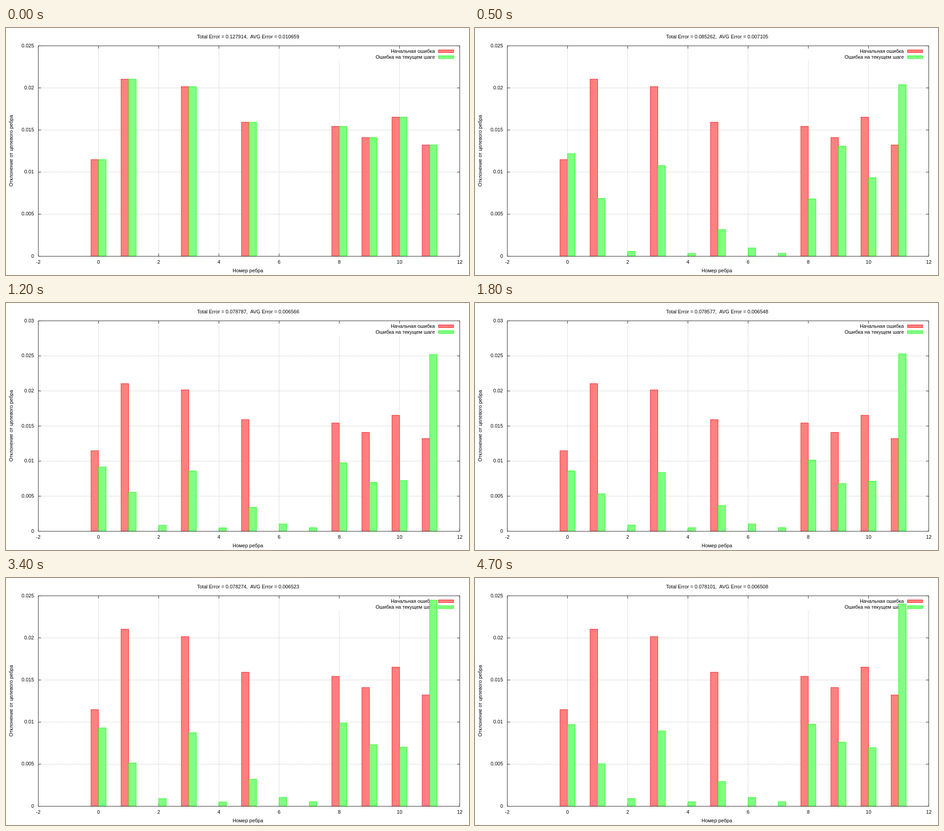
Recreate the animation shown at these times as an HTML page. Size 1025 by 547 pixels, loop 5000 ms.

```html
<!DOCTYPE html>
<html lang="ru">
<head>
<meta charset="utf-8">
<title>Отклонение рёбер</title>
<style>
  html, body { margin: 0; width: 100%; height: 100%; overflow: hidden; background: #fff; }
  svg { display: block; width: 100%; height: 100%; stroke-width: 0.85; }
  text { font: 11px "Liberation Sans", Arial, sans-serif; fill: #000; white-space: pre; }
  .mid { text-anchor: middle; }
  .end { text-anchor: end; }
  .grid { stroke: #a0a0a0; stroke-dasharray: 1.5 2; fill: none; }
  .axis { stroke: #000; fill: none; }
  .red { fill: #ff8080; stroke: #f00; }
  .green { fill: #80ff80; stroke: #0f0; }
</style>
</head>
<body>
<svg id="chart" viewBox="0 0 1025 547"></svg>
<script>
const LOOP = 5000;
const LEFT = 71.5, RIGHT = 1004.5, TOP = 39.5, BOTTOM = 505.5, TIC = 6;

// Moments (ms) at which the solver takes a step
const times = [0, 100, 300, 400, 500, 600, 700, 800, 900, 1000, 1200, 1500, 1800, 2100,
  3400, 3500, 3700, 4000, 4300, 4700];

// Steps that the tracks below pass through
const keys = [0, 2, 4, 7, 12, 19];
const total = [127913.9, 101650, 85262, 79101, 78577, 78101];  // 1e-6
const tracks = {                                               // 1e-5, by edge number
  0: [1148, 1198, 1219, 1003, 861, 971],
  1: [2104, 1579, 688, 591, 534, 504],
  3: [2015, 1679, 1077, 895, 837, 895],
  5: [1592, 1010, 317, 302, 367, 294],
  8: [1543, 1250, 682, 920, 1015, 975],
  9: [1410, 531, 1308, 726, 680, 761],
  10: [1653, 874, 934, 739, 713, 696],
  11: [1322, 1916, 2039, 2505, 2529, 2403]
};
// Edges without an initial error grow towards a limit: [limit, rate]
const growing = { 2: [93, 0.25], 4: [53, 0.25], 6: [105, 0.7], 7: [55, 0.25] };

const chart = document.getElementById('chart');
const xAt = v => LEFT + (v + 2) * (RIGHT - LEFT) / 14;
const path = (cls, d) => `<path class="${cls}" d="${d}"/>`;
const text = (cls, x, y, s, extra = '') => `<text class="${cls}" x="${x}" y="${y}" ${extra}>${s}</text>`;
const box = (cls, x1, y1, x2, y2) =>
  `<rect class="${cls}" x="${x1}" y="${y1}" width="${x2 - x1}" height="${y2 - y1}"/>`;

// Linear while the error drops, easing out as it settles
function along(track, step) {
  const last = keys.length - 2;
  const i = Math.min(keys.filter(k => k <= step).length - 1, last);
  const k = (step - keys[i]) / (keys[i + 1] - keys[i]);
  const ease = i === last ? 1 - (1 - k) ** 3 : k;
  return track[i] + (track[i + 1] - track[i]) * ease;
}

function errors(step) {
  return Array.from({ length: 12 }, (_, edge) => {
    if (tracks[edge]) return along(tracks[edge], step) / 1e5;
    const [limit, rate] = growing[edge];
    return limit * (1 - Math.exp(-rate * step)) / 1e5;
  });
}

function bars(cls, values, from, yAt) {
  return values.map((v, i) =>
    v > 0 ? box(cls, xAt(i + from), yAt(v), xAt(i + from + 0.25), BOTTOM) : '').join('');
}

function draw(step) {
  const values = errors(step), sum = along(total, step) / 1e6;
  const max = Math.max(...values) > 0.025 ? 0.03 : 0.025;
  const yAt = v => BOTTOM - v * (BOTTOM - TOP) / max;
  let grid = '', tics = '', labels = '';

  for (let n = 0, rows = Math.round(max / 0.005); n <= rows; n++) {
    const v = n * 0.005, y = yAt(v);
    if (n > 0 && n < rows) grid += `M${LEFT} ${y}H${RIGHT}`;
    tics += `M${LEFT} ${y}h${TIC}M${RIGHT} ${y}h${-TIC}`;
    labels += text('end', 62, y + 3.1, +v.toFixed(3));
  }
  for (let v = -2; v <= 12; v += 2) {
    const x = xAt(v), start = v === 8 || v === 10 ? 72 : TOP;  // the legend hides the grid
    if (v > -2 && v < 12) grid += `M${x} ${BOTTOM}V${start}`;
    tics += `M${x} ${BOTTOM}v${-TIC}M${x} ${TOP}v${TIC}`;
    labels += text('mid', x, 522, v);
  }

  chart.innerHTML = path('grid', grid) + path('axis', tics) + labels +
    text('mid', 536, 22.6, `Total Error = ${sum.toFixed(6)},  AVG Error = ${(sum / 12).toFixed(6)}`) +
    text('mid', 535.5, 541, 'Номер ребра') +
    text('mid', 0, 0, 'Отклонение от целевого ребра', 'transform="translate(15 272) rotate(-90)"') +
    text('end', 949.5, 55, 'Начальная ошибка') +
    text('end', 949.5, 68, 'Ошибка на текущем шаге') +
    box('red', 957.5, 48.5, 991, 54.5) +
    box('green', 957.5, 61.5, 991, 67.5) +
    bars('red', errors(0), -0.25, yAt) +
    bars('green', values, 0, yAt) +
    box('axis', LEFT, TOP, RIGHT, BOTTOM);
}

let shown = -1;
function tick() {
  const t = performance.now() % LOOP;
  const step = times.filter(start => start <= t).length - 1;
  if (step !== shown) draw(shown = step);
  requestAnimationFrame(tick);
}
tick();
</script>
</body>
</html>
```
